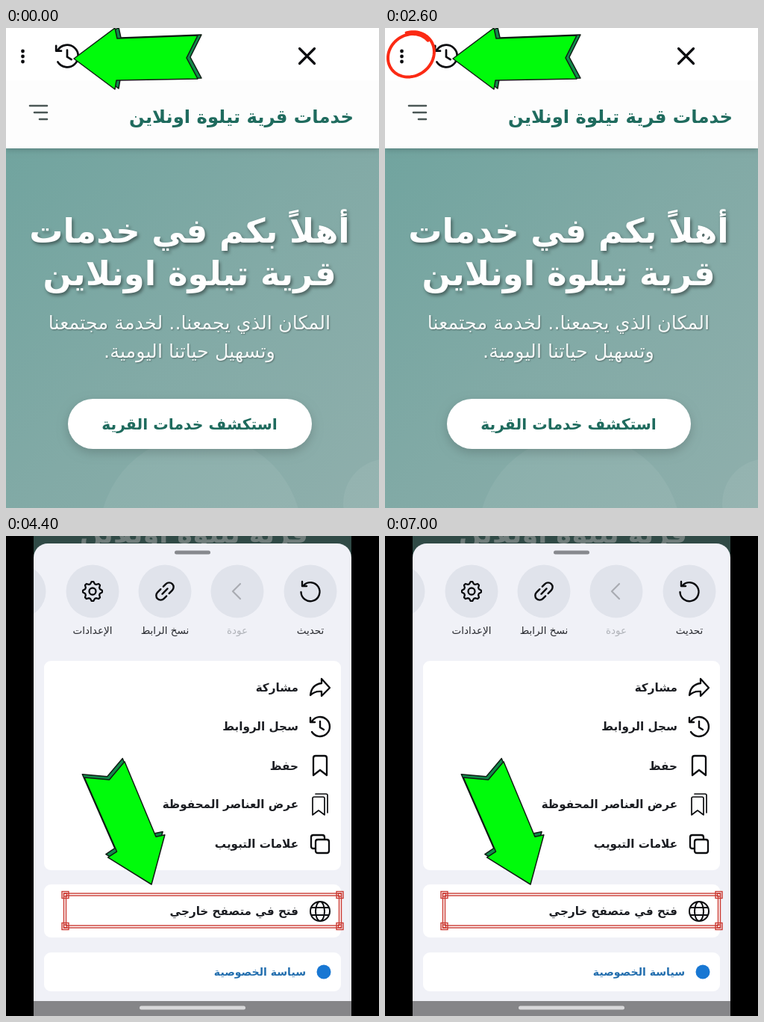
Animation, 500 px wide and 642 px high, one loop 7100 ms. Source, as an HTML page with a canvas:

```html
<!DOCTYPE html>
<html lang="ar">
<head>
<meta charset="utf-8">
<title>فتح في متصفح خارجي</title>
<style>
html, body { margin: 0; width: 100%; height: 100%; overflow: hidden; background: #000; }
canvas { display: block; }
</style>
</head>
<body>
<canvas id="stage" width="500" height="642"></canvas>
<script>
const ctx = document.getElementById('stage').getContext('2d');
const TAU = Math.PI * 2;
const LOOP = 7100, CUT = 3600, STEP = 100;
const VILLAGE = 'قرية تيلوة اونلاين';
const INK = '#0b0c0f', GREEN = '#1f6b5e', CHIP = '#e0e3eb';

const clamp = v => Math.max(0, Math.min(1, v));
const ease = v => v * v * (3 - 2 * v);

function text(str, x, y, size, color, { bold = false, align = 'center' } = {}) {
  ctx.font = `${bold ? 'bold ' : ''}${size}px "DejaVu Sans", sans-serif`;
  ctx.direction = 'rtl';
  ctx.textAlign = align;
  ctx.fillStyle = color;
  ctx.fillText(str, x, y);
}

function rect(x, y, w, h, color) {
  ctx.fillStyle = color;
  ctx.fillRect(x, y, w, h);
}

function roundRect(x, y, w, h, r, color) {
  ctx.beginPath();
  ctx.roundRect(x, y, w, h, r);
  ctx.fillStyle = color;
  ctx.fill();
}

function disc(x, y, r, color) {
  ctx.beginPath();
  ctx.arc(x, y, r, 0, TAU);
  ctx.fillStyle = color;
  ctx.fill();
}

function shadow(color, blur, x, y, draw) {
  ctx.save();
  ctx.shadowColor = color;
  ctx.shadowBlur = blur;
  ctx.shadowOffsetX = x;
  ctx.shadowOffsetY = y;
  draw();
  ctx.restore();
}

// Strokes SVG path data around a local origin.
function icon(x, y, data, color = INK, width = 2.3, angle = 0) {
  ctx.save();
  ctx.translate(x, y);
  ctx.rotate(angle);
  ctx.strokeStyle = color;
  ctx.lineWidth = width;
  ctx.lineCap = ctx.lineJoin = 'round';
  ctx.stroke(new Path2D(data));
  ctx.restore();
}

function historyIcon(x, y, scale, width) {
  ctx.save();
  ctx.translate(x, y);
  ctx.scale(scale, scale);
  icon(0, 0, 'M-11-7A13 13 0 1 1-11 7M-13-12V-6H-7M0-7V1L5 4', INK, width / scale);
  ctx.restore();
}

function polygon(points, fill) {
  ctx.beginPath();
  points.forEach(([x, y]) => ctx.lineTo(x, y));
  ctx.closePath();
  ctx.fillStyle = fill;
  ctx.fill();
  ctx.stroke();
}

const ARROW = [[0, 0], [55, -41], [58, -27], [166, -31], [151, -1], [166, 27], [57, 29], [55, 41]];

// The tip sits at x, y; the shaft runs along the rotated x axis.
function greenArrow(x, y, angle) {
  ctx.save();
  ctx.translate(x, y);
  ctx.rotate(angle);
  ctx.strokeStyle = '#101c14';
  ctx.lineWidth = 1.5;
  ctx.lineJoin = 'round';
  polygon(ARROW.map(([u, v]) => [u + 5, v - 1]), '#128a49');
  polygon(ARROW, '#00fb0b');
  ctx.restore();
}

// A tilted pen stroke that overshoots its own start along the top.
function penCircle(t) {
  const head = ease(clamp((t - 50) / 650));
  const tail = ease(clamp((t - 3000) / 400));
  if (head <= tail) return;
  const steps = 100;
  ctx.save();
  ctx.translate(34, 36);
  ctx.rotate(-0.6);
  ctx.beginPath();
  for (let i = 0; i <= steps; i++) {
    const p = tail + (head - tail) * i / steps;
    const a = -0.1 - p * (TAU + 1.1);
    const r = 1 - 0.05 * Math.cos(p * Math.PI);
    ctx.lineTo(32 * r * Math.cos(a), 28 * r * Math.sin(a));
  }
  ctx.strokeStyle = '#fb2a14';
  ctx.lineWidth = 4;
  ctx.lineCap = ctx.lineJoin = 'round';
  ctx.stroke();
  ctx.restore();
}

function drawWelcome(t) {
  const teal = ctx.createLinearGradient(0, 160, 500, 642);
  teal.addColorStop(0, '#71a49f');
  teal.addColorStop(0.5, '#82aaa6');
  teal.addColorStop(1, '#8fafac');
  rect(0, 160, 500, 482, teal);
  disc(261, 680, 136, 'rgba(255,255,255,.06)');
  disc(512, 636, 60, 'rgba(255,255,255,.06)');

  shadow('rgba(0,0,0,.25)', 8, 0, 1, () => rect(0, 0, 500, 161, '#fdfdfd'));
  rect(0, 0, 500, 70, '#fff');

  [31, 38, 45].forEach(y => disc(22.5, y, 2.4, INK));
  historyIcon(82, 37.5, 1.14, 2.7);
  icon(403.5, 37.5, 'M-10-10L10 10M10-10L-10 10', INK, 3.2);
  icon(0, 0, 'M32 104H55M38 113H55M45 122H55', '#4b5756', 2.6);
  text('خدمات ' + VILLAGE, 466, 127, 24.3, GREEN, { bold: true, align: 'right' });

  shadow('rgba(0,0,0,.42)', 4, 2, 3, () => {
    text('أهلاً بكم في خدمات', 246, 287, 45, '#fff', { bold: true });
    text(VILLAGE, 246, 344, 45, '#fff', { bold: true });
  });
  shadow('rgba(0,0,0,.35)', 2, 1, 1, () => {
    text('المكان الذي يجمعنا.. لخدمة مجتمعنا', 246, 403, 25.5, '#f5f9f8');
    text('وتسهيل حياتنا اليومية.', 246, 441, 25.5, '#f5f9f8');
  });

  shadow('rgba(0,0,0,.18)', 14, 0, 5, () => roundRect(83, 496, 327, 67, 33.5, '#fff'));
  text('استكشف خدمات القرية', 246, 537, 20.4, GREEN, { bold: true });

  greenArrow(91, 41, 0);
  penCircle(t);
}

function gear(x, y) {
  ctx.beginPath();
  for (let i = 0; i < 32; i++) {
    const r = i % 4 < 2 ? 13 : 10.3;
    const a = (i - 0.5) * TAU / 32;
    ctx.lineTo(x + r * Math.cos(a), y + r * Math.sin(a));
  }
  ctx.closePath();
  ctx.strokeStyle = INK;
  ctx.lineWidth = 2.2;
  ctx.lineJoin = 'round';
  ctx.stroke();
  icon(x, y, 'M4.5 0A4.5 4.5 0 1 1-4.5 0A4.5 4.5 0 1 1 4.5 0');
}

function redFrame() {
  const box = (x, y, w, h) => ctx.strokeRect(x, y, w, h);
  ctx.strokeStyle = '#cb3a32';
  ctx.lineWidth = 1.4;
  box(77.5, 478, 372, 46);
  box(80.5, 481, 366, 40);
  for (const x of [75, 443]) {
    for (const y of [475.5, 517.5]) {
      box(x, y, 9, 9);
      box(x + 2.5, y + 2.5, 4, 4);
    }
  }
}

const CHIPS = [
  ['تحديث', 408, INK],
  ['عودة', 310, '#b1b4ba'],
  ['نسخ الرابط', 213, INK],
  ['الإعدادات', 116, INK]
];

const ROWS = [
  ['مشاركة', 208],
  ['سجل الروابط', 260],
  ['حفظ', 313],
  ['عرض العناصر المحفوظة', 364],
  ['علامات التبويب', 417],
  ['فتح في متصفح خارجي', 507]
];

function drawMenu() {
  rect(0, 0, 500, 642, '#000');
  ctx.save();
  ctx.beginPath();
  ctx.rect(37, 0, 426, 642);
  ctx.clip();
  rect(37, 0, 426, 40, '#304a46');
  text(VILLAGE, 252, 9, 35, '#707d7b', { bold: true });
  roundRect(37, 10, 426, 640, [19, 19, 0, 0], '#f0f1f7');
  roundRect(226, 19.5, 48, 5, 2.5, '#87898e');
  disc(18, 74, 35.5, CHIP);

  for (const [label, x, color] of CHIPS) {
    disc(x, 74, 35.5, CHIP);
    text(label, x, 131, 13.5, color === INK ? '#292b30' : color);
  }
  icon(408, 74, 'M-9-8A12.5 12.5 0 1 1-12.5 1M-11-13V-7H-5', INK, 2.4);
  icon(310, 74, 'M4-10L-6 0L4 10', '#a9acb2', 2.2);
  icon(213, 74, 'M-2-6H-8A6 6 0 0 0-8 6H-3M2 6H8A6 6 0 0 0 8-6H3M-5 0H5', INK, 2.4, -Math.PI / 4);
  gear(116, 74);

  roundRect(51, 167, 398, 280, 9, '#fff');
  roundRect(51, 466, 398, 71, 9, '#fff');
  roundRect(51, 557, 398, 52, 9, '#fff');
  for (const [label, y] of ROWS) {
    text(label, 392, y, 15.2, '#1b1d22', { bold: true, align: 'right' });
  }

  icon(421, 203, 'M2-12L13 0L2 11V5C-5 4-9 6-13 10C-12 1-7-5 2-6Z');
  historyIcon(421, 255, 1, 2.4);
  icon(421, 307, 'M-9-10Q-9-13-6-13H6Q9-13 9-10V13L0 6L-9 13Z');
  icon(421, 359, 'M-10-8Q-10-10-8-10H4Q6-10 6-8V14L-2 8L-10 14ZM-6-14H8Q10-14 10-12V11', INK, 1.7);
  icon(421, 412, 'M-3-6H9Q12-6 12-3V9Q12 12 9 12H-3Q-6 12-6 9V-3Q-6-6-3-6ZM-7 6H-9Q-12 6-12 3V-9Q-12-12-9-12H3Q6-12 6-9V-7');
  icon(421, 502, 'M13 0A13 13 0 1 1-13 0A13 13 0 1 1 13 0M6 0A6 13 0 1 1-6 0A6 13 0 1 1 6 0M-12-5H12M-12 5H12', INK, 2);

  disc(426, 583, 9.5, '#1877d3');
  text('سياسة الخصوصية', 402, 588, 14.1, '#226eae', { bold: true, align: 'right' });

  rect(37, 622, 426, 20, '#858588');
  roundRect(179, 628.5, 142, 5, 2.5, '#d8d8da');
  ctx.restore();

  redFrame();
  greenArrow(195, 466, -111.6 * Math.PI / 180);
}

function frame() {
  const t = performance.now() % LOOP;
  if (t < CUT) drawWelcome(Math.floor(t / STEP) * STEP);
  else drawMenu();
  requestAnimationFrame(frame);
}
frame();
</script>
</body>
</html>
```
